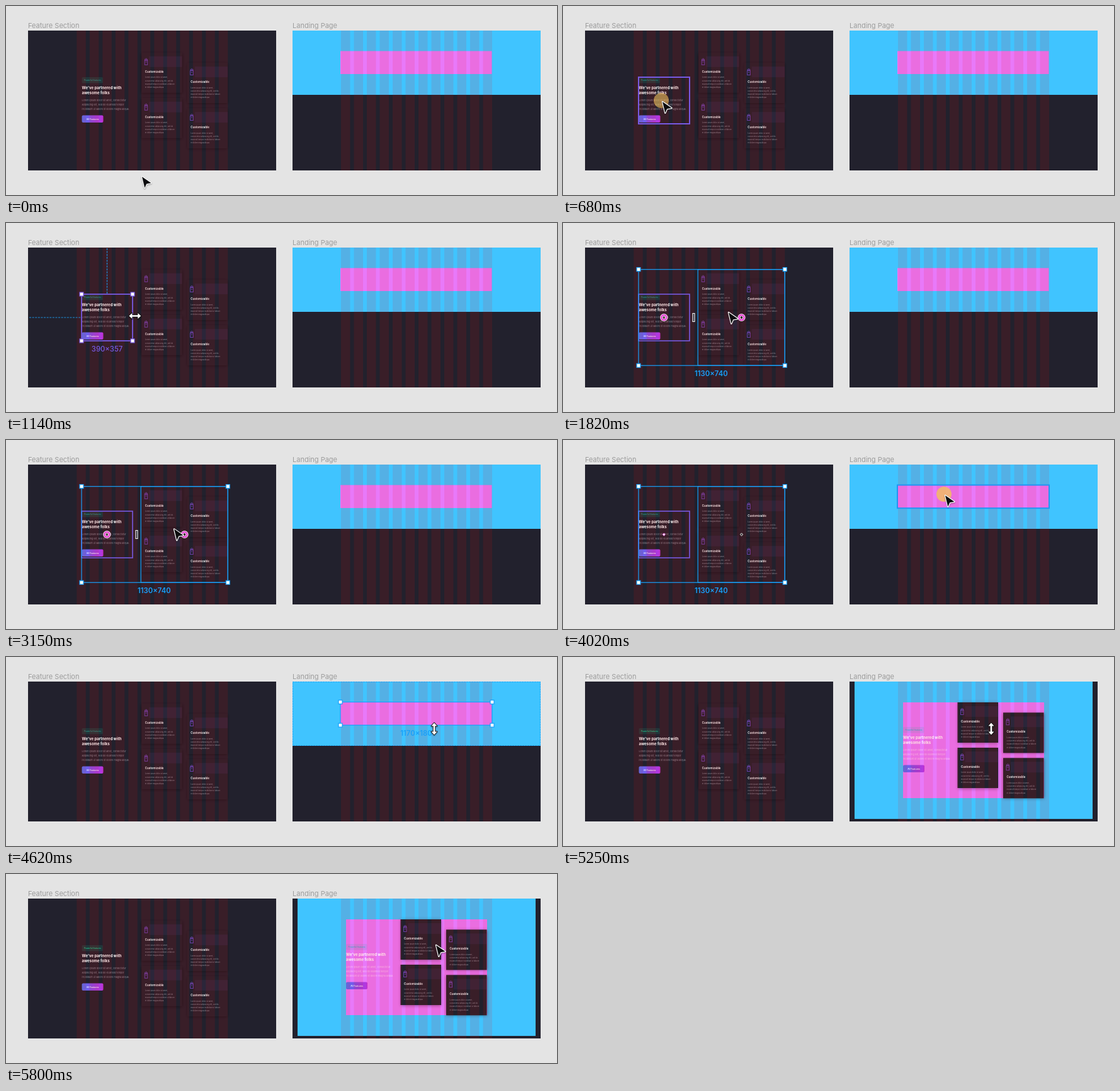
An HTML page with a canvas for the animation above (6270 ms loop, 875 by 300 pixels).

```html
<!DOCTYPE html>
<html lang="en">
<head>
<meta charset="utf-8">
<title>Design board</title>
<style>
  html, body { margin: 0; width: 100%; height: 100%; overflow: hidden; background: #e4e4e4; }
  canvas { display: block; width: 875px; height: 300px; }
</style>
</head>
<body>
<canvas id="stage"></canvas>
<script>
const W = 875, H = 300, LOOP = 6270;
const BLUE = '#18a0fb', PURPLE = '#7759e2', DARK = '#22212d';
const canvas = document.getElementById('stage');
const ctx = canvas.getContext('2d');
const ratio = Math.max(1, window.devicePixelRatio || 1);
canvas.width = W * ratio;
canvas.height = H * ratio;

const easeInOut = u => u < .5 ? 4 * u ** 3 : 1 - (2 - 2 * u) ** 3 / 2;
const easeOut = u => 1 - (1 - u) ** 2.35;

// Progress that advances in n equal jumps, the first at a and the last at b.
function stepped(t, a, b, n) {
  if (t < a) return 0;
  return Math.min(1, (Math.floor((t - a) / ((b - a) / (n - 1)) + .001) + 1) / n);
}

const MOVES = [
  { a: 210, b: 520, n: 5, to: [158, 152], ease: easeInOut },
  { a: 1050, b: 1670, n: 9, to: [263, 142], ease: easeOut },
  { a: 3150, b: 3610, n: 7, to: [607, 88], ease: easeInOut },
  { a: 4460, b: 4620, n: 3, to: [680, 114], ease: easeInOut },
  { a: 5400, b: 5480, n: 2, to: [683, 113], ease: easeInOut }
];

function pointer(t) {
  let x = 216, y = 271;
  for (const m of MOVES) {
    const k = m.ease(stepped(t, m.a, m.b, m.n));
    x += (m.to[0] - x) * k;
    y += (m.to[1] - y) * k;
  }
  return { x, y };
}

function box(x, y, w, h, color) {
  ctx.fillStyle = color;
  ctx.fillRect(x, y, w, h);
}

function round(x, y, w, h, r, fill) {
  ctx.beginPath();
  ctx.roundRect(x, y, w, h, r);
  ctx.fillStyle = fill;
  ctx.fill();
}

function frame(x, y, w, h, color, width = 1.5) {
  ctx.strokeStyle = color;
  ctx.lineWidth = width;
  ctx.strokeRect(x, y, w, h);
}

function line(x1, y1, x2, y2, color, width = 1) {
  ctx.strokeStyle = color;
  ctx.lineWidth = width;
  ctx.beginPath();
  ctx.moveTo(x1, y1);
  ctx.lineTo(x2, y2);
  ctx.stroke();
}

function text(str, x, y, size, color, weight = 400, align = 'left') {
  ctx.font = `${weight} ${size}px Inter, Roboto, sans-serif`;
  ctx.textAlign = align;
  ctx.fillStyle = color;
  ctx.fillText(str, x, y);
}

function polygon(points) {
  ctx.beginPath();
  points.forEach(([x, y], i) => i ? ctx.lineTo(x, y) : ctx.moveTo(x, y));
  ctx.closePath();
}

function columns(x) {
  for (let i = 0; i < 12; i++) box(x + i * 20.5, 39, 14.5, 222, 'rgba(255,0,0,.1)');
}

function icon(x, y) {
  ctx.strokeStyle = '#7c48c8';
  ctx.lineWidth = .8;
  ctx.strokeRect(x + .5, y + 3.5, 4.6, 7);
  for (let i = 0; i < 3; i++) line(x + 1 + i * 1.8, y + 3.5, x + 1 + i * 1.8, y + (i % 2 ? 0 : 1), '#8a55d6', .8);
  line(x + 1.8, y + 6, x + 3.9, y + 6, '#8a55d6', .7);
}

function card(x, y) {
  ctx.save();
  ctx.shadowColor = 'rgba(0,0,0,.4)';
  ctx.shadowBlur = 5 * ratio;
  ctx.shadowOffsetY = ratio;
  box(x, y, 64.5, 64, DARK);
  ctx.restore();
  box(x + 12, y + 6, 52.5, 17, 'rgba(130,90,190,.09)');
  icon(x + 4.5, y + 9);
  text('Customizable', x + 5.5, y + 32, 4.5, '#fff', 600);
  ['Lorem ipsum dolor sit amet,',
   'consectetur adipiscing elit, sed do',
   'eiusmod tempor incididunt ut labore',
   'et dolore magna aliqua.'
  ].forEach((s, i) => text(s, x + 5.5, y + 40.4 + i * 5.3, 2.75, '#96929c'));
}

function cards(x, y) {
  card(x, y);
  card(x, y + 72);
  card(x + 72.5, y + 16.3);
  card(x + 72.5, y + 88.3);
}

function intro(x, y, badge, body) {
  round(x, y, 33.5, 9.5, 1.5, 'rgba(30,190,150,.13)');
  text('Powerful features', x + 3.5, y + 6.1, 3.2, badge, 500);
  text("We've partnered with", x, y + 19, 6, '#fff', 700);
  text('awesome folks', x, y + 27.2, 6, '#fff', 700);
  ['Lorem ipsum dolor sit amet, consectetur',
   'adipiscing elit, sed do eiusmod tempor',
   'incididunt ut labore et dolore magna aliqua.'
  ].forEach((s, i) => text(s, x, y + 38.4 + i * 6.6, 3.7, body));
  const g = ctx.createLinearGradient(x, 0, x + 34, 0);
  g.addColorStop(0, '#4f74f0');
  g.addColorStop(.5, '#8b4ae6');
  g.addColorStop(1, '#bd33dc');
  round(x, y + 60.5, 34, 11.5, 2, g);
  text('All Features', x + 17, y + 67.5, 3.5, '#fff', 500, 'center');
}

function boards(pasted) {
  box(0, 0, W, H, '#e4e4e4');
  text('Feature Section', 35, 35, 11, '#9c9c9c');
  text('Landing Page', 455, 35, 11, '#9c9c9c');

  box(35, 39, 394, 222, DARK);
  intro(120.5, 113, pasted ? '#1fd091' : '#2a988a', '#8f8b96');
  cards(215.2, 73.8);
  columns(112.3);

  box(455, 39, 394, 222, DARK);
  if (pasted) {
    box(463, 39, 378, 218, '#40c4ff');
    box(540, 72, 224, 152, '#e879f9');
    intro(540, 111, '#3fa9c4', '#f7c4f4');
    cards(626.5, 72);
  } else {
    box(455, 39, 394, 102, '#40c4ff');
    box(531, 71.5, 240.5, 36.5, '#e879f9');
  }
  columns(532);
}

function handles(x, y, w, h, color) {
  for (const [hx, hy] of [[x, y], [x + w, y], [x, y + h], [x + w, y + h]]) {
    box(hx - 3, hy - 3, 6, 6, '#fff');
    frame(hx - 3, hy - 3, 6, 6, color, 1.2);
  }
}

function ring(x, y) {
  for (const [color, width] of [['#fff', 4.2], ['#e63fd2', 2.4]]) {
    ctx.strokeStyle = color;
    ctx.lineWidth = width;
    ctx.beginPath();
    ctx.arc(x, y, 4, 0, Math.PI * 2);
    ctx.stroke();
  }
}

function diamond(x, y, fill, edge) {
  polygon([[x, y - 2.2], [x + 2.2, y], [x, y + 2.2], [x - 2.2, y]]);
  ctx.fillStyle = fill;
  ctx.fill();
  ctx.strokeStyle = edge;
  ctx.lineWidth = .9;
  ctx.stroke();
}

function selectIntro() {
  ctx.setLineDash([3, 1.6]);
  line(37, 150, 120, 150, '#1c8fdc', 1.2);
  line(160.5, 40, 160.5, 113, '#1c8fdc', 1.2);
  ctx.setLineDash([]);
  frame(120, 113, 81, 74, PURPLE, 1.8);
  handles(120, 113, 81, 74, PURPLE);
  text('390×357', 160.5, 203.5, 11.3, PURPLE, 500, 'center');
}

function selectBoth(inside) {
  frame(120, 113, 81, 74, PURPLE, 1.6);
  frame(120, 73.7, 232.3, 152.5, BLUE, 1.2);
  frame(214.2, 73.7, 138.1, 152.5, BLUE, 1.2);
  handles(120, 73.7, 232.3, 152.5, BLUE);
  text('1130×740', 235.3, 243, 11.3, BLUE, 600, 'center');
  if (inside) {
    ring(160.3, 150);
    ring(283.5, 150);
    box(206, 143.5, 3, 13, DARK);
    frame(206, 143.5, 3, 13, '#fff', 1.1);
  } else {
    diamond(160.3, 150, '#fff', '#e63fd2');
    diamond(283.5, 150, '#333', '#fff');
  }
}

function selectSlot() {
  ctx.setLineDash([2, 2]);
  frame(455.5, 39.5, 393, 101, BLUE, 1);
  ctx.setLineDash([]);
  frame(531, 71.5, 241, 36.7, BLUE, 1.2);
  handles(531, 71.5, 241, 36.7, BLUE);
  text('1170×180', 651.5, 124.5, 11.3, BLUE, 600, 'center');
}

function overlays(t, p) {
  const overIntro = p.x > 120 && p.x < 201 && p.y > 113 && p.y < 187;
  if (t < 750 && overIntro) frame(120, 113, 81, 74, PURPLE, 2);
  if (t >= 750 && t < 1820) selectIntro();
  if (t >= 1050 && t < 1820 && p.x > 214) frame(214.2, 73.7, 138.1, 152.5, BLUE, 2);
  if (t >= 1820 && t < 4085) selectBoth(p.x < 352);
  if (t >= 3150 && t < 3760 && p.x > 455) frame(455, 39, 394, 102, BLUE, 2);
  if (t >= 3760 && t < 4085) frame(531, 71.5, 241, 36.7, '#2196f3', 2);
  if (t >= 4085 && t < 5250) selectSlot();
}

function click(t, p) {
  for (const [a, b] of [[680, 890], [1750, 1820], [3930, 4160]]) {
    if (t < a || t >= b) continue;
    const u = (t - a) / (b - a);
    ctx.globalAlpha = u < .37 ? .6 : u < .67 ? .8 : .4;
    ctx.fillStyle = '#f2c05c';
    ctx.beginPath();
    ctx.arc(p.x - 2, p.y - 2, 12, 0, Math.PI * 2);
    ctx.fill();
    ctx.globalAlpha = 1;
  }
}

function cursor(t, p) {
  const across = t >= 1050 && t < 1670 && Math.abs(p.x - 201) < 6;
  const down = t >= 4620 && t < 5400;
  ctx.save();
  ctx.translate(p.x, p.y);
  ctx.lineJoin = 'round';
  ctx.shadowColor = 'rgba(0,0,0,.35)';
  ctx.shadowBlur = 2 * ratio;
  ctx.shadowOffsetY = ratio;
  if (across || down) {
    if (down) ctx.rotate(Math.PI / 2);
    polygon([[-9.5, 0], [-4.5, -4.5], [-4.5, -1.3], [4.5, -1.3], [4.5, -4.5],
      [9.5, 0], [4.5, 4.5], [4.5, 1.3], [-4.5, 1.3], [-4.5, 4.5]]);
    ctx.strokeStyle = '#111';
    ctx.fillStyle = '#fff';
    ctx.lineWidth = 1.8;
  } else {
    polygon([[0, 0], [14.5, 10], [7.2, 11.2], [4.3, 17.8]]);
    ctx.strokeStyle = '#fff';
    ctx.fillStyle = '#0c0c0e';
    ctx.lineWidth = 2.4;
  }
  ctx.stroke();
  ctx.shadowColor = 'transparent';
  ctx.fill();
  ctx.restore();
}

function draw() {
  const t = performance.now() % LOOP;
  const p = pointer(t);
  ctx.setTransform(ratio, 0, 0, ratio, 0, 0);
  boards(t >= 5250);
  overlays(t, p);
  click(t, p);
  cursor(t, p);
  requestAnimationFrame(draw);
}
draw();
</script>
</body>
</html>
```
